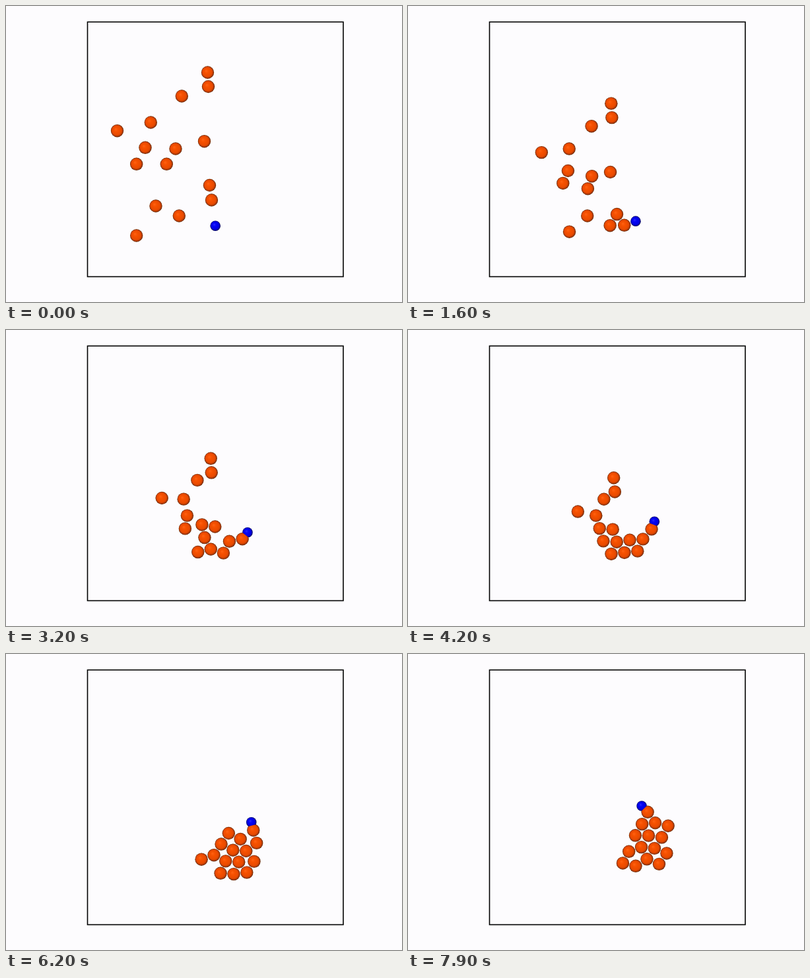
Animation, 600 px wide and 450 px high, one loop 8000 ms. Source, as an HTML page with a canvas:

```html
<!DOCTYPE html>
<html lang="en">
<head>
<meta charset="utf-8">
<title>Swarm chase</title>
<style>
  html, body { margin: 0; width: 100%; height: 100%; overflow: hidden; background: #fdfcfe; }
  canvas { display: block; }
</style>
</head>
<body>
<canvas id="stage" width="600" height="450"></canvas>
<script>
const ctx = document.getElementById("stage").getContext("2d");

const LOOP = 8000, STEP = 100;     // ms
const SUBSTEPS = 5, PASSES = 6;
const SPEED = 29.5;                // hunter speed, px/s
const SPACING = 20;                // closest distance between hunters
const SCENT_SPEED = 20, MIN_LAG = 0.7;
const ORBIT = { x: 317.2, y: 276, r: 58.2, turn: 0.3107 };

const HUNTER = { r: 9.7, colors: ["#ff6214", "#f65100", "#e94a00", "#b23b00", "#521c00"] };
const PREY = { r: 7.8, colors: ["#2a2aff", "#0606f4", "#0000e4", "#0000a8", "#000040"] };

const STARTS = [
  [305.5, 101], [306.5, 122.5], [266.3, 137], [219.3, 177], [168.5, 189.7],
  [211, 215.3], [257, 217], [300.5, 205.7], [197.7, 240.3], [243.3, 240.3],
  [308.5, 272.5], [311.5, 295], [227, 304], [262.3, 319], [197.7, 349],
];

// The prey circles at a steady pace; t in seconds
function preyAt(t) {
  const a = ORBIT.turn * t;
  return { x: ORBIT.x + ORBIT.r * Math.sin(a), y: ORBIT.y + ORBIT.r * Math.cos(a) };
}

function gap(a, b) {
  const x = b.x - a.x, y = b.y - a.y;
  return { x, y, d: Math.hypot(x, y) || 1e-6 };
}

// Hunters follow the trail: the farther away, the older the place they head for
function chase(hunter, t, reach) {
  const lag = Math.max(MIN_LAG, gap(hunter, preyAt(t)).d / SCENT_SPEED);
  const to = gap(hunter, preyAt(Math.max(0, t - lag)));
  const k = Math.min(1, reach / to.d);
  hunter.x += to.x * k;
  hunter.y += to.y * k;
}

function separate(swarm) {
  swarm.forEach((a, i) => {
    for (const b of swarm.slice(i + 1)) {
      const g = gap(a, b);
      if (g.d >= SPACING) continue;
      const k = (SPACING - g.d) / g.d / 2;
      a.x -= g.x * k;
      a.y -= g.y * k;
      b.x += g.x * k;
      b.y += g.y * k;
    }
  });
}

function simulate() {
  const swarm = STARTS.map(([x, y]) => ({ x, y }));
  const dt = STEP / SUBSTEPS / 1000;
  const poses = [];
  for (let n = 0; n < LOOP / STEP * SUBSTEPS; n++) {
    if (n % SUBSTEPS === 0) poses.push(swarm.map(h => ({ ...h })));
    swarm.forEach(h => chase(h, n * dt, SPEED * dt));
    for (let i = 0; i < PASSES; i++) separate(swarm);
  }
  return poses;
}

function sphere({ x, y }, { r, colors }) {
  const shade = ctx.createRadialGradient(x - r * 0.25, y - r * 0.28, 0, x, y, r);
  [0, 0.32, 0.72, 0.88, 1].forEach((stop, i) => shade.addColorStop(stop, colors[i]));
  ctx.fillStyle = shade;
  ctx.beginPath();
  ctx.arc(x, y, r, 0, Math.PI * 2);
  ctx.fill();
}

// Intersecting spheres meet along a straight chord
function clipAtChord(prey, hunter) {
  const g = gap(prey, hunter);
  const cut = (g.d ** 2 + PREY.r ** 2 - HUNTER.r ** 2) / (2 * g.d);
  if (cut >= PREY.r) return;
  ctx.translate(prey.x, prey.y);
  ctx.rotate(Math.atan2(g.y, g.x));
  ctx.beginPath();
  ctx.rect(-20, -20, 20 + cut, 40);
  ctx.resetTransform();
  ctx.clip();
}

function draw(swarm, prey) {
  ctx.fillStyle = "#fdfcfe";
  ctx.fillRect(0, 0, 600, 450);
  ctx.strokeStyle = "#000";
  ctx.lineWidth = 1.6;
  ctx.strokeRect(123.5, 24.3, 387.5, 387.2);
  swarm.forEach(h => sphere(h, HUNTER));
  ctx.save();
  swarm.forEach(h => clipAtChord(prey, h));
  sphere(prey, PREY);
  ctx.restore();
}

const poses = simulate();
const start = performance.now();
function tick() {
  const t = Math.max(0, performance.now() - start) % LOOP;
  const i = Math.floor(t / STEP);
  draw(poses[i], preyAt(i * STEP / 1000));
  requestAnimationFrame(tick);
}
tick();
</script>
</body>
</html>
```
